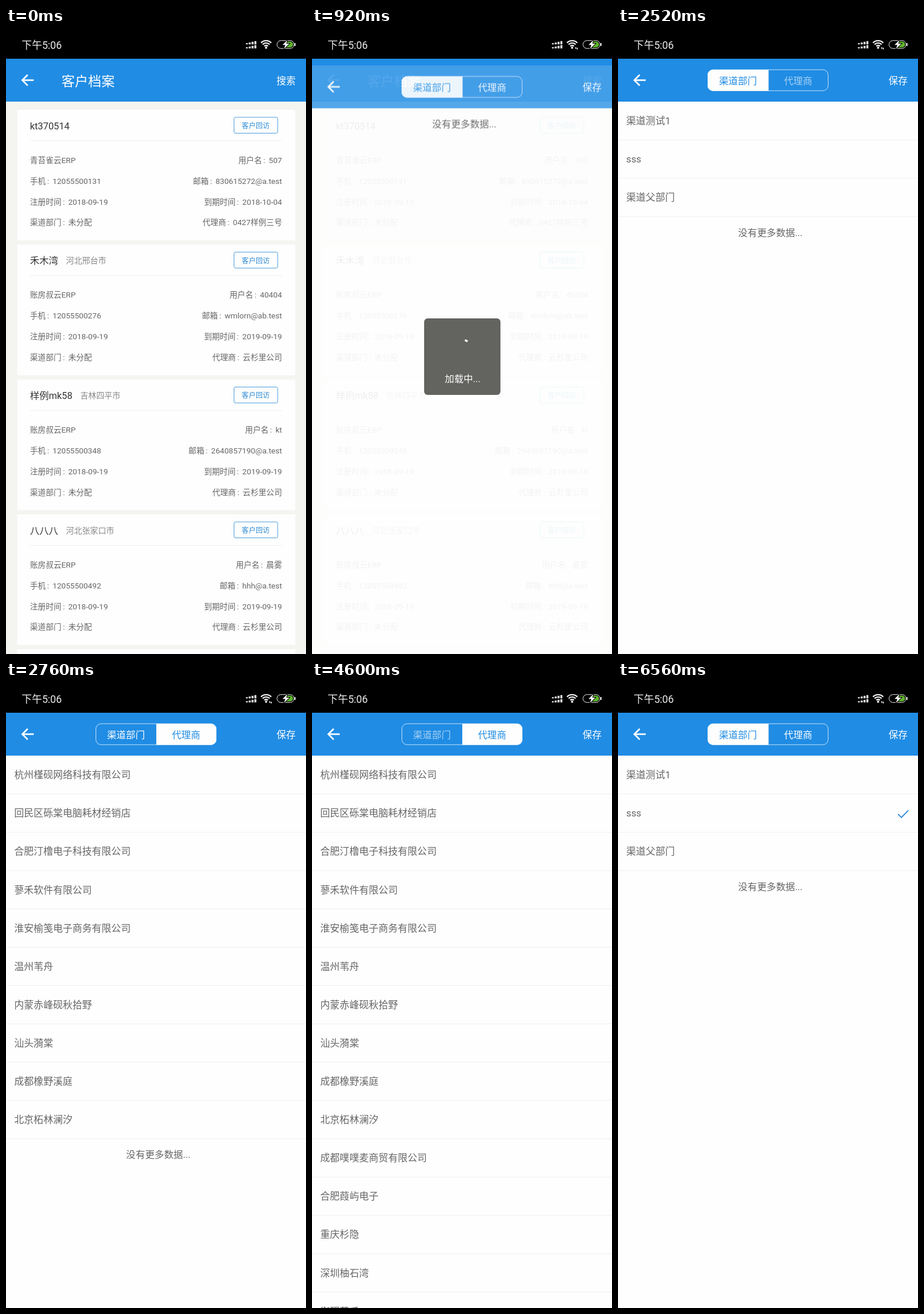
These frames come from a looping animation (519 by 1080 pixels, 8 s). An HTML page with a canvas:

```html
<!DOCTYPE html>
<html lang="zh-CN">
<head>
<meta charset="utf-8">
<style>
html, body { margin: 0; width: 100%; height: 100%; overflow: hidden; background: #fdfefd; }
canvas { display: block; }
</style>
</head>
<body>
<canvas id="stage" width="519" height="1080"></canvas>
<script>
const W = 519, H = 1080, LOOP = 8000;
const BLUE = '#208ce4', PAPER = '#fdfefd', GREY = '#666', LINE = '#eef0ee';
const FONT = 'Roboto, "Noto Sans CJK SC", "Noto Sans CJK", sans-serif';
const BAR = 53, TOP = 127, ROW = 66.1;

const screen = document.getElementById('stage').getContext('2d');
const layerCanvas = document.createElement('canvas');
layerCanvas.width = W;
layerCanvas.height = H;
const layer = layerCanvas.getContext('2d');
let g = screen;

const CARDS = [
  { name: 'kt370514', city: '', product: '青苔雀云ERP', user: '507', phone: '12055500131',
    mail: '830615272@a.test', end: '2018-10-04', agent: '0427样例三号' },
  { name: '禾木湾', city: '河北邢台市', product: '账房叔云ERP', user: '40404', phone: '12055500276',
    mail: 'wmlorn@ab.test', end: '2019-09-19', agent: '云杉里公司' },
  { name: '样例mk58', city: '吉林四平市', product: '账房叔云ERP', user: 'kt', phone: '12055500348',
    mail: '2640857190@a.test', end: '2019-09-19', agent: '云杉里公司' },
  { name: '八八八', city: '河北张家口市', product: '账房叔云ERP', user: '晨雾', phone: '12055500492',
    mail: 'hhh@a.test', end: '2019-09-19', agent: '云杉里公司' }
];
const DEPTS = ['渠道测试1', 'sss', '渠道父部门'];
const AGENTS = [
  '杭州槿砚网络科技有限公司', '回民区砾棠电脑耗材经销店', '合肥汀橹电子科技有限公司',
  '蓼禾软件有限公司', '淮安榆笺电子商务有限公司', '温州苇舟', '内蒙赤峰砚秋拾野',
  '汕头漪棠', '成都橡野溪庭', '北京柘林澜汐', '成都噗噗麦商贸有限公司',
  '合肥葭屿电子', '重庆杉隐', '深圳柚石湾', '衡阳苔禾'
];

const clamp = x => Math.max(0, Math.min(1, x));
const ramp = (t, a, b) => clamp((t - a) / (b - a));
const easeOut = (x, n) => 1 - Math.pow(1 - x, n);

// Opacity of a touched item: quick dip, hold, slow return.
function press(t, down, up, back = 240) {
  const dip = ramp(t, down - 40, down) * (1 - ramp(t, up, up + back));
  return 1 - 0.4 * dip;
}

function rect(x, y, w, h, color) {
  g.fillStyle = color;
  g.fillRect(x, y, w, h);
}

function text(str, x, cy, size, color, align = 'left', weight = 400) {
  g.font = `${weight} ${size}px ${FONT}`;
  g.fillStyle = color;
  g.textAlign = align;
  g.fillText(str, x, cy + size * 0.37);
  return g.measureText(str).width;
}

function line(points, color, width) {
  g.strokeStyle = color;
  g.lineWidth = width;
  g.beginPath();
  points.forEach(([x, y]) => g.lineTo(x, y));
  g.stroke();
}

function box(x, y, w, h, r, fill, stroke) {
  g.beginPath();
  g.roundRect(x, y, w, h, r);
  if (fill) { g.fillStyle = fill; g.fill(); }
  if (stroke) { g.strokeStyle = stroke; g.lineWidth = 1; g.stroke(); }
}

function fade(alpha, draw) {
  g.save();
  g.globalAlpha *= alpha;
  draw();
  g.restore();
}

function statusBar(t) {
  const ink = '#eee';
  rect(0, 0, W, BAR, '#000');
  text('下午5:06', 27, 29, 17.7, ink);

  for (let i = 0; i < 4; i++) {
    const x = 415 + i * 4.9, h = 2 + i * 1.2;
    rect(x, 28.2 - h, 3.4, h, ink);
    rect(x, 35.2 - h, 3.4, h, ink);
  }

  g.strokeStyle = ink;
  g.lineWidth = 2.3;
  for (const r of [4.5, 8.6, 12.6]) {
    g.beginPath();
    g.arc(450, 34.5, r, -Math.PI * 0.75, -Math.PI * 0.25);
    g.stroke();
  }
  g.fillStyle = ink;
  g.beginPath();
  g.arc(450, 34, 1.9, 0, 7);
  g.fill();
  const busy = (t >= 440 && t < 3640) || t >= 6560;
  if (busy) rect(455.5, 33, 1.6, 3, ink);
  if (busy || (t >= 4000 && t < 4120)) rect(458, 34, 1.6, 3, ink);

  box(468.8, 21.7, 29.5, 13.6, 6.8, '#000', ink);
  box(484, 23.6, 12.5, 9.8, [0, 4.9, 4.9, 0], '#5fb52b');
  rect(499, 26, 1.8, 5, ink);
  g.beginPath();
  [[486.5, 21], [478.5, 29.3], [483.2, 29.3], [481, 36], [490, 27], [485, 27]]
    .forEach(([x, y]) => g.lineTo(x, y));
  g.closePath();
  g.strokeStyle = '#000';
  g.lineWidth = 2;
  g.stroke();
  g.fillStyle = '#fff';
  g.fill();
}

function header(action) {
  rect(0, BAR, W, TOP - BAR, BLUE);
  line([[37.5, 80.7], [28.2, 90], [37.5, 99.3]], '#fff', 2.7);
  line([[28.5, 90], [48, 90]], '#fff', 2.7);
  text(action, 468, 91, 16.6, '#fff');
}

function field(label, value, x, cy, right) {
  const size = 13.6, gap = 11.8, w = label.length * size;
  g.font = `400 ${size}px ${FONT}`;
  if (right) x -= w + gap + g.measureText(value).width;
  text(label, x, cy, size, GREY);
  text(':', x + w + 2.5, cy, size, GREY);
  text(value, x + w + gap, cy, size, GREY);
}

function card(c, y) {
  const L = 41.5, R = 477.5;
  rect(19.5, y, 481, 225.5, PAPER);
  const w = text(c.name, L, y + 27.6, 16.3, '#333');
  text(c.city, L + w + 13.5, y + 27.6, 13.9, '#888');
  box(394.5, y + 13, 75.5, 27.5, 2.5, null, '#4a9bdf');
  text('客户回访', 432, y + 27.4, 12.1, '#2b8ad6', 'center');
  rect(L, y + 53, R - L, 1, LINE);
  text(c.product, L, y + 86.5, 13.6, GREY);
  field('用户名', c.user, R, y + 86.5, true);
  field('手机', c.phone, L, y + 122.5);
  field('邮箱', c.mail, R, y + 122.5, true);
  field('注册时间', '2018-09-19', L, y + 158.5);
  field('到期时间', c.end, R, y + 158.5, true);
  field('渠道部门', '未分配', L, y + 194.3);
  field('代理商', c.agent, R, y + 194.3, true);
}

function customers(t) {
  const y0 = 141, pitch = 232.7;
  rect(0, TOP, W, H - TOP, '#f4f5f1');
  header('搜索');
  text('客户档案', 96, 91, 23, '#fff', 'left', 500);
  CARDS.forEach((c, i) => card(c, y0 + i * pitch));
  rect(19.5, y0 + 4 * pitch, 481, 20, PAPER);

  const grow = ramp(t, 20, 640);
  if (grow > 0) {
    g.save();
    g.beginPath();
    g.rect(19.5, y0, 481, 225.5);
    g.clip();
    g.fillStyle = `rgba(0,0,0,${0.045 * ramp(t, 20, 200)})`;
    g.beginPath();
    g.arc(110, 335, 440 * easeOut(grow, 2), 0, 7);
    g.fill();
    g.restore();
  }
}

function tabs(t, agents) {
  box(155.5, 72, 208, 36.2, 9, null, 'rgba(255,255,255,.75)');
  if (agents) box(260, 72, 104, 36.4, [0, 9, 9, 0], PAPER);
  else box(155, 72, 105.5, 36.4, [9, 0, 0, 9], PAPER);
  fade(press(t, 4440, 4720), () => text('渠道部门', 207.5, 91, 16.4, agents ? '#fff' : BLUE, 'center'));
  fade(press(t, 2400, 2520), () => text('代理商', 311.5, 91, 16.4, agents ? BLUE : '#fff', 'center'));
}

function rowsAt(t) {
  if (t < 1200) return [];
  if (t < 2560) return DEPTS;
  if (t < 2720) return [];
  if (t < 2840) return AGENTS.slice(0, 10);
  if (t < 4720) return AGENTS;
  return t < 4800 ? [] : DEPTS;
}

function picker(t) {
  const agents = t >= 2560 && t < 4720;
  const rows = rowsAt(t);
  rect(0, BAR, W, H - BAR, PAPER);
  header('保存');
  tabs(t, agents);

  rows.forEach((name, i) => {
    const y = TOP + i * ROW;
    let alpha = 1;
    if (rows === DEPTS && i === 0) alpha = press(t, 5200, 5340);
    if (rows === DEPTS && i === 1) alpha = press(t, 6040, 6140, 220);
    fade(alpha, () => text(name, 14.3, y + 33, 16.8, GREY));
    rect(0, y + ROW - 0.5, W, 1, LINE);
  });
  text('没有更多数据...', 263.5, TOP + rows.length * ROW + 27.3, 16.4, GREY, 'center');

  if (t >= 5360) {
    const y = t < 6160 ? 0 : ROW;
    line([[484.3, 161.8 + y], [490.3, 167.6 + y], [502.3, 155.2 + y]], '#2a87d6', 1.7);
  }
  if (rows === AGENTS) {
    const a = 0.3 * (1 - ramp(t, 4060, 4320));
    rect(514, TOP, 5, 446, `rgba(0,0,0,${a})`);
  }
}

function opening(t) {
  const age = t - 805;
  const settle = easeOut(clamp(age / 350), 5);
  g = layer;
  g.clearRect(0, 0, W, H);
  picker(t);
  rect(0, BAR, W, TOP - BAR, `rgba(255,255,255,${0.4 * (1 - ramp(t, 820, 1000))})`);
  g = screen;
  fade(easeOut(clamp(age / 200), 3), () => g.drawImage(layerCanvas, 0, 86 * (1 - settle)));
}

function loading(t) {
  const age = t - 840;
  fade(1 - ramp(t, 1200, 1310), () => {
    box(194, 501, 132, 132, 6, 'rgba(96,96,93,.98)');
    text('加载中...', 260.5, 605, 16.2, '#fff', 'center');
    const start = -Math.PI / 2 + age / 300;
    const sweep = 0.16 + 4.6 * Math.pow(clamp(age / 480), 2);
    g.strokeStyle = '#fff';
    g.lineWidth = 3.6;
    g.beginPath();
    g.arc(260, 555, 17, start, start + sweep);
    g.stroke();
  });
}

function draw(t) {
  g = screen;
  rect(0, 0, W, H, PAPER);
  if (t < 1160) customers(t);
  if (t >= 1160) picker(t);
  else if (t > 805) opening(t);
  if (t >= 830 && t < 1310) loading(t);
  statusBar(t);
}

const born = performance.now();
function tick() {
  draw((performance.now() - born) % LOOP);
  requestAnimationFrame(tick);
}
tick();
</script>
</body>
</html>
```
